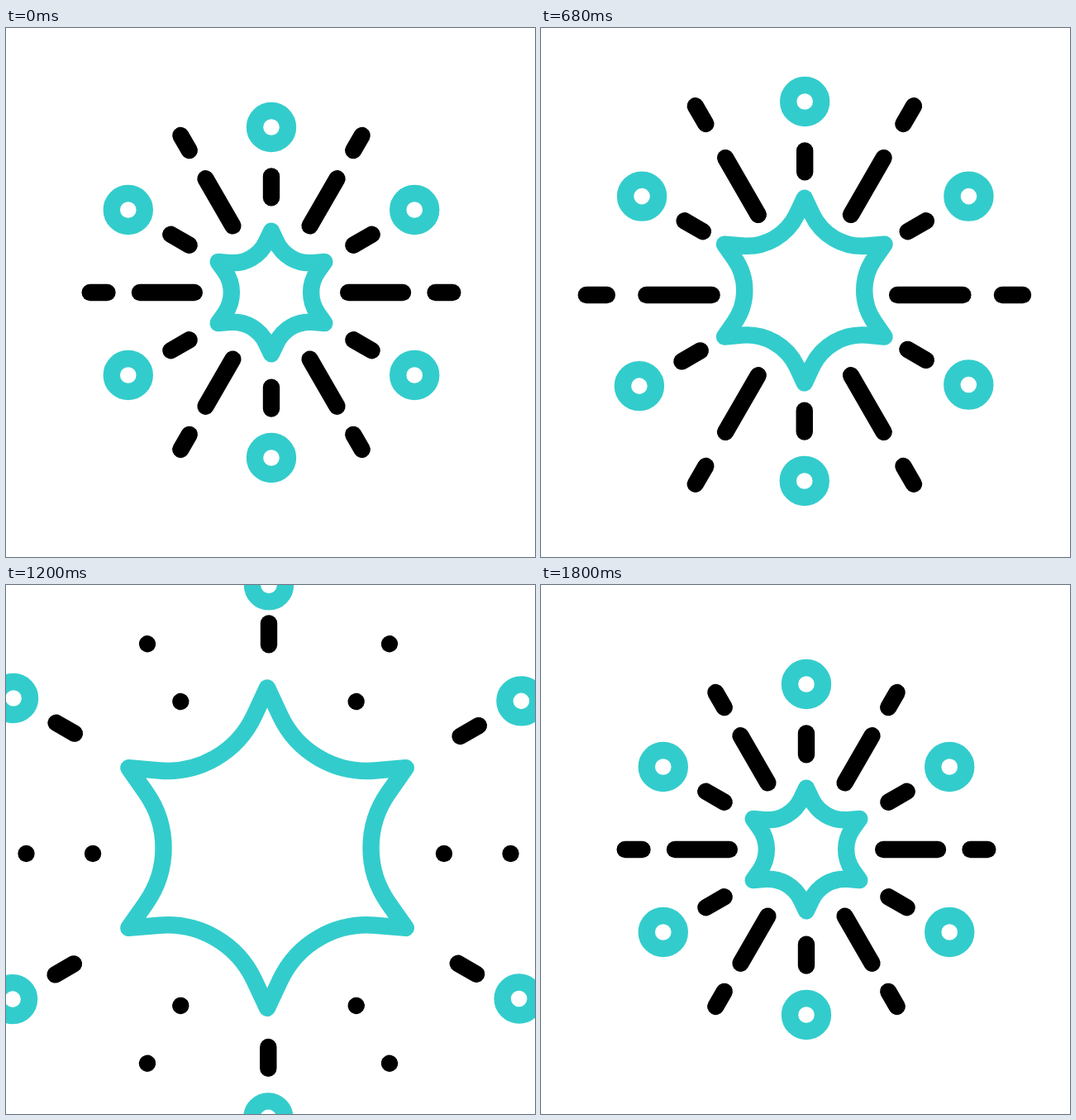
These frames come from a looping animation (640x640 px, 1.82 s). An HTML page with a canvas:

```html
<!DOCTYPE html>
<html lang="en">
<head>
<meta charset="utf-8">
<title>Firework</title>
<style>
  html, body { margin: 0; width: 100%; height: 100%; overflow: hidden; background: #fff; }
  canvas { display: block; }
</style>
</head>
<body>
<canvas id="stage" width="640" height="640"></canvas>
<script>
const ctx = document.getElementById('stage').getContext('2d');
const LOOP = 1820, TEAL = '#33cccc', BLACK = '#000', SIXTH = Math.PI / 3;

// Bead drift, clockwise from lower right: x, y of the slow burst, then of the exit.
const DRIFT = [
  [38, 19, 210, 146],
  [-3.7, 46, 0, 186],
  [-47.5, 21.5, -219, 141.5],
  [-42.3, -27, -229, -133],
  [-3, -51, 0, -163],
  [38.2, -27, 216, -125]
];
const TOP = 4;

// Smooth ease from 0 to 1 between two times.
function ease(t, from, to) {
  const x = Math.min(1, Math.max(0, (t - from) / (to - from)));
  return x * x * (3 - 2 * x);
}

function polar(cx, cy, angle, r) {
  return [cx + r * Math.cos(angle), cy + r * Math.sin(angle)];
}

function stroke(color) {
  ctx.strokeStyle = color;
  ctx.stroke();
}

function spoke(cx, cy, angle, r1, r2) {
  ctx.beginPath();
  ctx.moveTo(...polar(cx, cy, angle, r1));
  ctx.lineTo(...polar(cx, cy, angle, Math.max(r2, r1 + 0.01)));
  stroke(BLACK);
}

function drawRays(burst, trim) {
  const cx = 321 - 3.5 * burst, cy = 320 + 5 * burst, scale = 1 + 0.336 * burst;
  for (let i = 0; i < 6; i++) {
    for (const [inner, outer] of [[93.2, 159], [198.5, 219.3]]) {
      const start = inner + (outer - inner) * trim;
      spoke(cx, cy, i * SIXTH, start * scale, outer * scale);
    }
  }
}

function drawBeads(burst, exit) {
  DRIFT.forEach(([bx, by, ex, ey], i) => {
    const angle = (i + 0.5) * SIXTH;
    const x = 321 + bx * burst + ex * exit, y = 320 + by * burst + ey * exit;
    const lead = i === TOP ? 32 * exit : 0;
    spoke(x, y - lead, angle, 114.7, 140.5);
    const [px, py] = polar(x, y, angle, 200);
    ctx.beginPath();
    ctx.arc(px, py, 20, 0, 2 * Math.PI);
    stroke(TEAL);
  });
}

// Six sides, each an inward arc with straight ends.
function drawStar(burst, exit) {
  const cx = 321 - 3.7 * burst - 3 * exit, cy = 320 - 4 * burst + 5 * exit;
  const r = 74.3 + 61.7 * burst + 137 * exit;
  const bend = Math.asin(0.343 / 0.598);
  ctx.beginPath();
  for (let i = 0; i < 6; i++) {
    const angle = i * SIXTH;
    ctx.lineTo(...polar(cx, cy, angle - SIXTH / 2, r));
    const [ax, ay] = polar(cx, cy, angle, (0.648 + 0.598) * r);
    ctx.arc(ax, ay, 0.598 * r, angle + Math.PI + bend, angle + Math.PI - bend, true);
  }
  ctx.closePath();
  stroke(TEAL);
}

function draw(t) {
  const reborn = t >= 1400;
  const burst = reborn ? 0 : ease(t, 200, 1040);
  const trim = reborn ? 0 : ease(t, 805, 1200);
  const exit = reborn ? 0 : ease(t, 1040, 1400);
  ctx.clearRect(0, 0, 640, 640);
  ctx.globalAlpha = reborn ? ease(t, 1400, 1800) : 1 - ease(t, 1200, 1380);
  ctx.lineWidth = 20.4;
  ctx.lineCap = ctx.lineJoin = 'round';
  drawRays(burst, trim);
  drawBeads(burst, exit);
  drawStar(burst, exit);
}

const begin = performance.now();
function tick() {
  draw((performance.now() - begin) % LOOP);
  requestAnimationFrame(tick);
}
tick();
</script>
</body>
</html>
```
